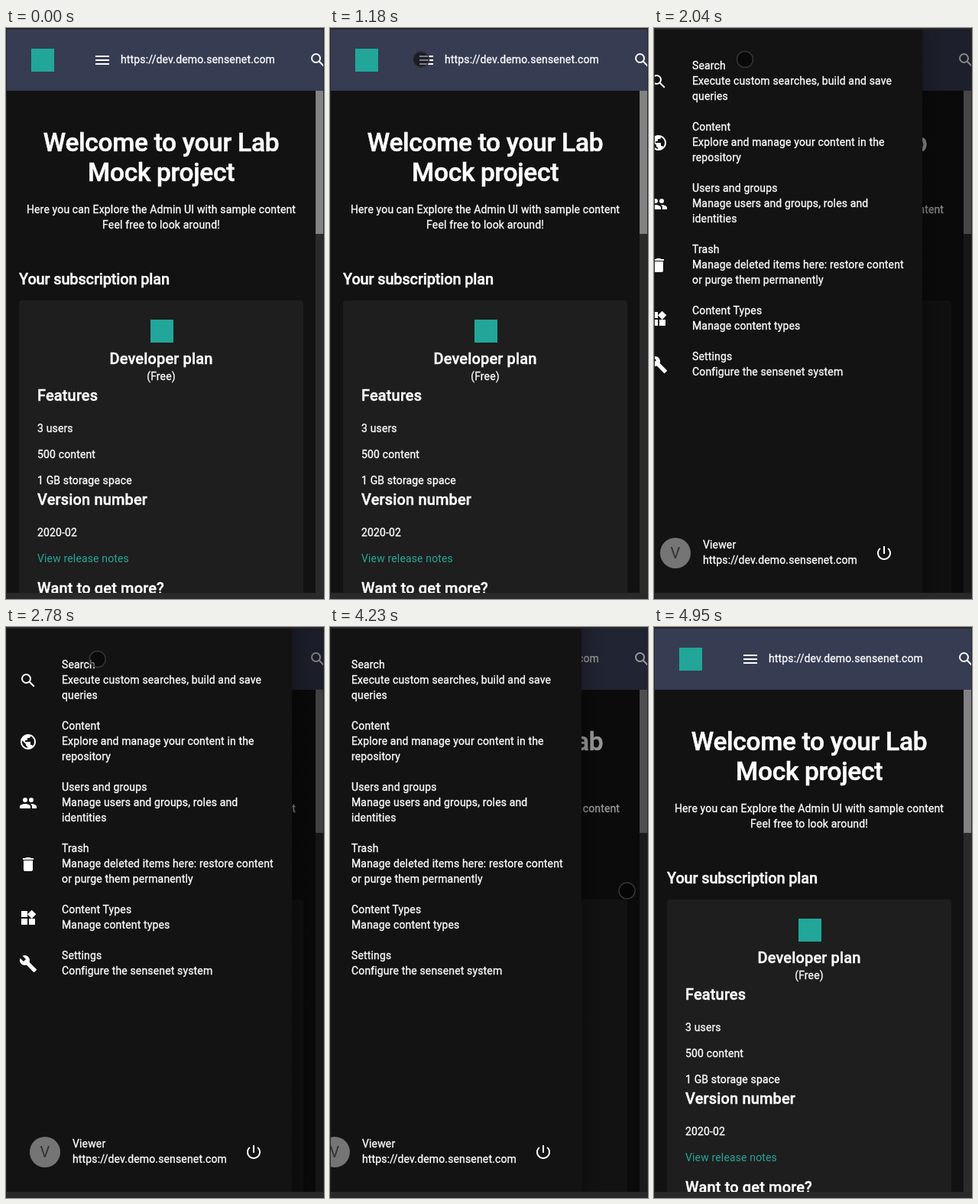
Write an HTML page that moves like this. It is 416 px wide and 746 px high and loops after 5720 ms.

```html
<!DOCTYPE html>
<html lang="en">
<head>
<meta charset="utf-8">
<title>Drawer menu</title>
<style>
  html, body { margin: 0; width: 100%; height: 100%; overflow: hidden; background: #29282b; }
  svg { display: block; width: 416px; height: 746px; }
  text { font: 400 14px Roboto, sans-serif; letter-spacing: .15px; fill: #fff; stroke: #fff; stroke-width: .3px; white-space: pre; }
  .head { font-size: 20px; font-weight: 500; stroke-width: .4px; }
  .title { font-size: 33.4px; font-weight: 500; stroke-width: .6px; }
  .tight { letter-spacing: -.00833em; }
  .mid { text-anchor: middle; }
  .link { fill: #26a69a; stroke: none; }
  .initial { font-size: 20px; fill: #303030; stroke: none; }
  .icon { fill: #fff; }
  .line { fill: none; stroke: #fff; stroke-width: 2; }
</style>
</head>
<body>
<svg viewBox="0 0 416 746">
  <defs>
    <clipPath id="view"><rect x="1" y="2" width="414" height="736"/></clipPath>
    <linearGradient id="shade"><stop stop-opacity=".22"/><stop offset=".4" stop-opacity=".08"/><stop offset="1" stop-opacity="0"/></linearGradient>
    <g id="search" class="line"><circle cx="9.5" cy="9.5" r="5.5"/><path d="M13.8 13.8L19.8 19.8"/></g>
    <path id="menu" class="icon" d="M3 18h18v-2H3zM3 13h18v-2H3zM3 6v2h18V6z"/>
    <path id="globe" class="icon" d="M12 2C6.48 2 2 6.48 2 12s4.48 10 10 10 10-4.48 10-10S17.52 2 12 2zm-1 17.93c-3.95-.49-7-3.85-7-7.93 0-.62.08-1.21.21-1.79L9 15v1c0 1.1.9 2 2 2v1.93zm6.9-2.54c-.26-.81-1-1.39-1.9-1.39h-1v-3c0-.55-.45-1-1-1H8v-2h2c.55 0 1-.45 1-1V7h2c1.1 0 2-.9 2-2v-.41c2.93 1.19 5 4.06 5 7.41 0 2.08-.8 3.97-2.1 5.39z"/>
    <g id="people" class="icon">
      <circle cx="16" cy="8" r="3"/><circle cx="8" cy="8" r="3"/>
      <path d="M8 13c-2.33 0-7 1.17-7 3.5V19h14v-2.5C15 14.17 10.33 13 8 13zM16 13c-.29 0-.62.02-.97.05 1.16.84 1.97 1.97 1.97 3.45V19h6v-2.5c0-2.33-4.67-3.5-7-3.5z"/>
    </g>
    <path id="bin" class="icon" d="M6 19c0 1.1.9 2 2 2h8c1.1 0 2-.9 2-2V7H6zM19 4h-3.5l-1-1h-5l-1 1H5v2h14z"/>
    <path id="widgets" class="icon" d="M13 13v8h8v-8zM3 21h8v-8H3zM3 3v8h8V3zM16.66 1.69L11 7.34 16.66 13l5.66-5.66z"/>
    <path id="wrench" class="icon" d="M22.7 19l-9.1-9.1c.9-2.3.4-5-1.5-6.9-2-2-5-2.4-7.4-1.3L9 6 6 9 1.6 4.7C.4 7.1.9 10.1 2.9 12.1c1.9 1.9 4.6 2.4 6.9 1.5l9.1 9.1c.4.4 1 .4 1.4 0l2.3-2.3c.5-.4.5-1.1.1-1.4z"/>
    <path id="power" class="icon" d="M13 3h-2v10h2zM17.83 5.17l-1.42 1.42C17.99 7.86 19 9.81 19 12c0 3.87-3.13 7-7 7s-7-3.13-7-7c0-2.19 1.01-4.14 2.58-5.42L6.17 5.17C4.23 6.82 3 9.26 3 12c0 4.97 4.03 9 9 9s9-4.03 9-9c0-2.74-1.23-5.18-3.17-6.83z"/>
  </defs>

  <rect width="416" height="746" fill="#29282b"/>
  <g clip-path="url(#view)">
    <rect x="1" y="2" width="414" height="736" fill="#121212"/>
    <rect x="1" y="2" width="414" height="80" fill="#363c52"/>
    <rect x="33" y="27" width="30" height="30" fill="#22a699"/>
    <use href="#menu" x="114" y="30"/>
    <text x="150" y="46">https://dev.demo.sensenet.com</text>
    <use href="#search" x="396" y="30"/>
    <rect x="405" y="82" width="10" height="656" fill="#2b2b2b"/>
    <rect x="405" y="82" width="10" height="187" fill="#828282"/>

    <text class="title tight mid" x="203" y="161">Welcome to your Lab</text>
    <text class="title tight mid" x="203" y="200">Mock project</text>
    <text class="mid" x="203" y="242">Here you can Explore the Admin UI with sample content</text>
    <text class="mid" x="203" y="262">Feel free to look around!</text>
    <text class="head tight" x="17" y="335">Your subscription plan</text>

    <rect x="17" y="356" width="372" height="400" rx="4" fill="#1e1e1e"/>
    <rect x="189" y="381" width="30" height="30" fill="#22a699"/>
    <text class="head mid" x="203" y="439">Developer plan</text>
    <text class="mid" x="203" y="460">(Free)</text>
    <text class="head" x="41" y="487">Features</text>
    <text x="41" y="528">3 users</text>
    <text x="41" y="562">500 content</text>
    <text x="41" y="596">1 GB storage space</text>
    <text class="head" x="41" y="623">Version number</text>
    <text x="41" y="664">2020-02</text>
    <text class="link" x="41" y="698">View release notes</text>
    <text class="head" x="41" y="739">Want to get more?</text>

    <rect id="backdrop" x="1" y="2" width="414" height="736"/>
    <g id="drawer">
      <rect x="374" y="2" width="32" height="736" fill="url(#shade)"/>
      <rect x="0" y="2" width="374" height="736" fill="#131313"/>
      <g id="items"></g>
      <circle cx="51" cy="686" r="20" fill="#757575"/>
      <text class="initial mid" x="51" y="693">V</text>
      <text x="87" y="680">Viewer</text>
      <text x="87" y="700">https://dev.demo.sensenet.com</text>
      <use href="#power" x="312" y="674"/>
    </g>
  </g>
  <circle id="cursor" r="10.5" stroke="#363636" stroke-width="1.4"/>
</svg>
<script>
  const LOOP = 5720;
  const DRAWER_WIDTH = 374;
  const $ = id => document.getElementById(id);

  const items = [
    ["search", 58, "Search", "Execute custom searches, build and save", "queries"],
    ["globe", 138, "Content", "Explore and manage your content in the", "repository"],
    ["people", 218, "Users and groups", "Manage users and groups, roles and", "identities"],
    ["bin", 298, "Trash", "Manage deleted items here: restore content", "or purge them permanently"],
    ["widgets", 368, "Content Types", "Manage content types"],
    ["wrench", 428, "Settings", "Configure the sensenet system"]
  ];
  $("items").innerHTML = items.map(([icon, y, ...lines]) => {
    const top = y + 26 - lines.length * 10;
    return `<use href="#${icon}" x="17" y="${y}"/>` +
      lines.map((line, i) => `<text x="73" y="${top + i * 20}">${line}</text>`).join("");
  }).join("");

  // The picture only changes at these moments, like a screen capture.
  const run = (from, to, count) =>
    Array.from({ length: count }, (_, i) => from + (to - from) * i / (count - 1));
  const ticks = [
    0, ...run(620, 1180, 8), 1740, 1890, 1950, 2040, 2100,
    2780, ...run(2870, 3350, 7), 3410, 3510, ...run(3580, 3980, 6), 4040,
    4230, ...run(4290, 4790, 7), 4850, 4950
  ];

  const clamp = v => Math.min(1, Math.max(0, v));
  const linear = p => p;
  const smooth = p => p * p * (3 - 2 * p);
  const cubic = p => p < .5 ? 4 * p ** 3 : 1 - 4 * (1 - p) ** 3;
  const accelerate = p => p ** 1.4;

  // CSS-style cubic-bezier(x1, 0, x2, 1)
  function bezier(x1, x2) {
    const axis = (s, a, b) => 3 * (1 - s) ** 2 * s * a + 3 * (1 - s) * s * s * b + s ** 3;
    return x => {
      if (x <= 0 || x >= 1) return clamp(x);
      let low = 0, high = 1;
      for (let i = 0; i < 24; i++) {
        const mid = (low + high) / 2;
        if (axis(mid, x1, x2) < x) low = mid; else high = mid;
      }
      return axis(low, 0, 1);
    };
  }
  const slideIn = bezier(0, .2);
  const slideOut = bezier(.4, .6);
  const fade = bezier(.4, .2);

  // Each move: start, end, from, to, easing
  const moves = [
    [620, 1020, [259, 261], [114, 33], smooth],
    [1020, 1180, [114, 33], [119, 41], smooth],
    [2720, 3350, [119, 41], [314.5, 334.5], cubic],
    [3350, 3510, [314.5, 334.5], [325.5, 340.5], linear],
    [3510, 3980, [325.5, 340.5], [386, 344.5], smooth],
    [3980, 4040, [386, 344.5], [388.5, 344.5], linear],
    [4280, 4850, [388.5, 344.5], [377, 733], accelerate]
  ];

  function cursorAt(t) {
    const [start, end, from, to, ease] = moves.filter(m => m[0] <= t).pop() || moves[0];
    const p = ease(clamp((t - start) / (end - start)));
    return from.map((v, i) => v + (to[i] - v) * p);
  }

  function render(now) {
    const t = ticks.filter(tick => tick <= now).pop();
    const enter = clamp((t - 1913) / 187);
    const leave = clamp((t - 4184) / 195);
    const shown = slideIn(enter) - slideOut(leave);
    $("drawer").setAttribute("transform", `translate(${Math.round((shown - 1) * DRAWER_WIDTH)} 0)`);
    $("drawer").setAttribute("visibility", shown > 0 ? "visible" : "hidden");
    $("backdrop").setAttribute("opacity", .5 * (fade(enter) - fade(leave)));

    const [x, y] = cursorAt(t);
    const cursor = $("cursor");
    cursor.setAttribute("cx", x);
    cursor.setAttribute("cy", y);
    cursor.setAttribute("fill-opacity", t >= 1740 && t < 1890 ? .65 : .5);
    cursor.setAttribute("visibility", t >= 620 && t < 4950 ? "visible" : "hidden");
  }

  const begin = performance.now();
  function frame() {
    render((performance.now() - begin) % LOOP);
    requestAnimationFrame(frame);
  }
  frame();
</script>
</body>
</html>
```
